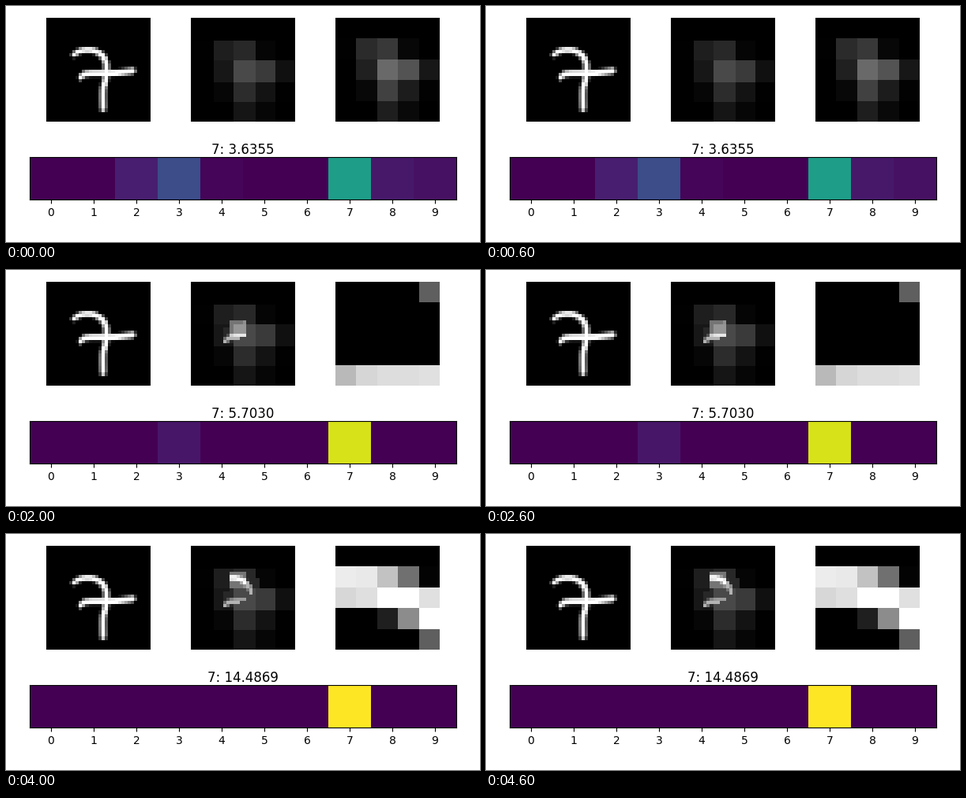
A matplotlib script for the animation above (5 s loop, 600 by 300 pixels).

```python
import numpy as np
import matplotlib.pyplot as plt
from matplotlib.animation import FuncAnimation

W, H, DPI = 600, 300, 100
N = 32          # canvas side in cells
PATCH = 5       # glimpse side in cells
DIM = 0.7       # brightness of what was already seen
FLOOR = 0.16    # least brightness of a visited cell

# Key points of the two pen strokes, in cells
HOOK = [(7.8, 11.1), (9.8, 9.85), (12, 9.46), (14.2, 9.72), (16.4, 10.95),
        (17.8, 13), (18, 15.5), (17.7, 19), (17, 21.5), (17, 27.4)]
BAR = [(10, 18.2), (11, 17.08), (12.7, 16.65), (16, 16.6), (21, 16.5), (26, 15.85)]

SPOTS = [(10, 14), (12, 12), (16, 10), (12, 8)]   # top-left cell of each glimpse
SCORES = [3.6355, 5.4563, 5.7030, 9.7820, 14.4869]
THREE = [0.235, 0.115, 0.06, 0.005, 0]            # probability left for class 3
FIRST = {2: 0.085, 4: 0.012, 8: 0.065, 9: 0.045}  # other rivals, first step only


def spline(points, per=60):
    """Catmull-Rom curve and its parameter, counted in key points."""
    p = np.array(points, float)
    p = np.vstack([p[0], p, p[-1]])
    t = np.linspace(0, len(points) - 1, per * (len(points) - 1) + 1)
    i = np.minimum(t.astype(int), len(points) - 2)
    u = (t - i)[:, None]
    a, b, c, d = p[i], p[i + 1], p[i + 2], p[i + 3]
    curve = b + u / 2 * (c - a + u * (2 * a - 5 * b + 4 * c - d
                                      + u * (3 * (b - c) + d - a)))
    return curve, t


def stroke(points, radius):
    """Soft-edged line whose pen presses in at the start."""
    curve, t = spline(points)
    r = radius * (1 - 0.25 * np.exp(-1.5 * t))
    yy, xx = np.mgrid[:N, :N]
    dist = np.hypot(xx[..., None] - curve[:, 0], yy[..., None] - curve[:, 1])
    return np.clip(r - dist, 0, 1).max(axis=-1)


def shrink(img):
    """Resize to PATCH x PATCH with a triangle filter."""
    size = N / PATCH
    centre = (np.arange(PATCH)[:, None] + 0.5) * size
    weight = np.maximum(0, 1 - abs(np.arange(N) + 0.5 - centre) / size)
    weight /= weight.sum(axis=1, keepdims=True)
    return weight @ img @ weight.T


def spread(small):
    """Enlarge the coarse look over the canvas, leaving one empty edge cell."""
    sizes = np.diff(np.round(np.linspace(1, N, PATCH + 1)).astype(int))
    big = np.zeros((N, N))
    big[1:, 1:] = small.repeat(sizes, axis=0).repeat(sizes, axis=1)
    return big


def window(spot):
    x, y = spot
    return slice(y, y + PATCH), slice(x, x + PATCH)


def state(step):
    """Memory canvas, current glimpse and class probabilities at a step."""
    glimpse = shrink(digit)
    memory = DIM * spread(glimpse)
    for spot in SPOTS[:step]:
        win = window(spot)
        glimpse = digit[win]
        memory[win] = np.maximum(memory[win], np.maximum(DIM * glimpse, FLOOR))
    if step:
        memory[win] += 1 - DIM
    probs = np.zeros((1, 10))
    probs[0, 3] = THREE[step]
    if step == 0:
        probs[0, list(FIRST)] = list(FIRST.values())
    probs[0, 7] = 1 - probs.sum()
    return memory, glimpse, probs


def image(x, y, w, h, data, cmap):
    ax = fig.add_axes([x / W, 1 - (y + h) / H, w / W, h / H])
    return ax.imshow(data, cmap=cmap, vmin=0, vmax=1, interpolation="nearest",
                     aspect="auto")


def panel(x, data):
    # Kept just inside whole pixels so rounding cannot widen the image
    im = image(x + 0.01, 15.01, 131.98, 131.98, data, "gray")
    im.axes.axis("off")
    return im


digit = np.maximum(stroke(HOOK, 1.4), stroke(BAR, 1.48))

fig = plt.figure(figsize=(W / DPI, H / DPI), dpi=DPI, facecolor="white")
memory, glimpse, probs = state(0)
panel(51, digit)
memory_im = panel(234, memory)
glimpse_im = panel(417, glimpse)
probs_im = image(29.999, 192, 540, 54, probs, "viridis")
probs_im.axes.set_xticks(range(10))
probs_im.axes.set_yticks([])
title = probs_im.axes.set_title("", fontsize=12, pad=1.44)


def draw(step):
    memory, glimpse, probs = state(step)
    memory_im.set_data(memory)
    glimpse_im.set_data(glimpse)
    probs_im.set_data(probs)
    title.set_text(f"{probs.argmax()}: {SCORES[step]:.4f}")
    return memory_im, glimpse_im, probs_im, title


anim = FuncAnimation(fig, draw, frames=len(SCORES), interval=1000, repeat=True,
                     repeat_delay=0)
plt.show()
```
